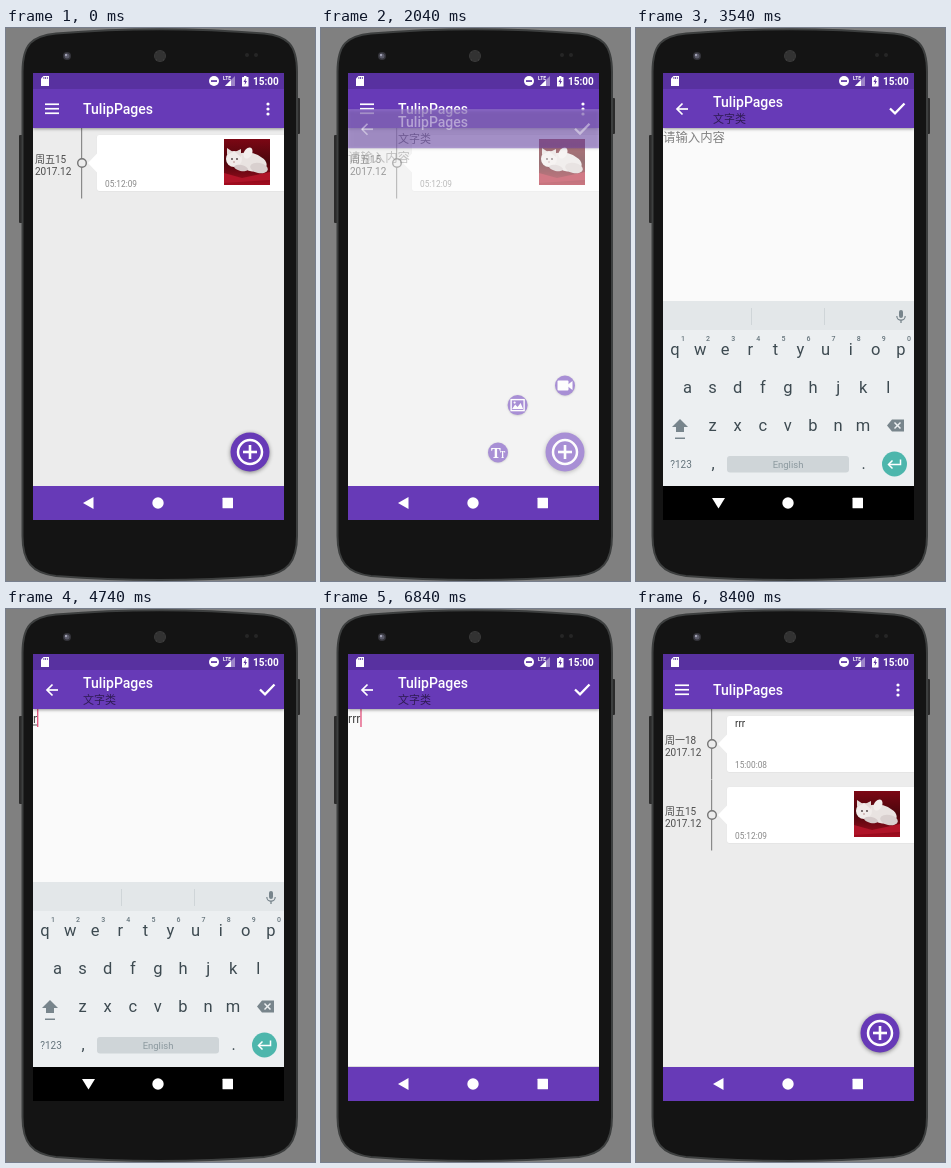
Animation, 309 px wide and 553 px high, one loop 9.24 s. Source, as an HTML page with a canvas:

```html
<!DOCTYPE html>
<html lang="zh-CN">
<head>
<meta charset="utf-8">
<style>
html, body { margin: 0; width: 100%; height: 100%; overflow: hidden; background: #808080; }
canvas { display: block; width: 309px; height: 553px; }
</style>
</head>
<body>
<canvas id="stage"></canvas>
<script>
const W = 309, H = 553, LOOP = 9240, TICK = 60;
const PURPLE = '#673ab7', GREY = '#78858c';
const TITLE = 'TulipPages';
const FONT = 'Roboto, "Noto Sans CJK SC", "Noto Sans CJK", sans-serif';
const canvas = document.getElementById('stage');
const c = canvas.getContext('2d');
const ratio = window.devicePixelRatio || 1;
canvas.width = W * ratio;
canvas.height = H * ratio;
c.scale(ratio, ratio);

const clamp = x => Math.max(0, Math.min(1, x));
const easeOut = x => 1 - (1 - x) ** 2;
const backOut = x => 1 + 2.2 * (x - 1) ** 3 + 1.2 * (x - 1) ** 2;

function rect(x, y, w, h, fill, r = 0) {
  c.fillStyle = fill;
  c.beginPath();
  c.roundRect(x, y, w, h, r);
  c.fill();
}
function disc(x, y, r, fill) {
  c.fillStyle = fill;
  c.beginPath();
  c.arc(x, y, r, 0, 7);
  c.fill();
}
function ring(x, y, r, color, width) {
  c.strokeStyle = color;
  c.lineWidth = width;
  c.beginPath();
  c.arc(x, y, r, 0, 7);
  c.stroke();
}
function oval(x, y, rx, ry, turn, fill) {
  c.fillStyle = fill;
  c.beginPath();
  c.ellipse(x, y, rx, ry, turn, 0, 7);
  c.fill();
}
function trace(points) {
  c.beginPath();
  for (let i = 0; i < points.length; i += 2) c.lineTo(points[i], points[i + 1]);
}
function poly(fill, ...points) {
  trace(points);
  c.fillStyle = fill;
  c.fill();
}
function line(color, width, ...points) {
  trace(points);
  c.strokeStyle = color;
  c.lineWidth = width;
  c.stroke();
}
function text(s, x, y, size, color, weight = 400, align = 'left', family = FONT) {
  c.font = `${weight} ${size}px ${family}`;
  c.textAlign = align;
  c.fillStyle = color;
  c.fillText(s, x, y);
}
function layer(draw, { alpha = 1, dy = 0, clip } = {}) {
  c.save();
  if (clip) {
    c.beginPath();
    c.rect(...clip);
    c.clip();
  }
  c.globalAlpha = alpha;
  c.translate(0, dy);
  draw();
  c.restore();
}
function withShadow(blur, dy, alpha, draw) {
  c.save();
  c.shadowColor = `rgba(0,0,0,${alpha})`;
  c.shadowBlur = blur * ratio;
  c.shadowOffsetY = dy * ratio;
  draw();
  c.restore();
}

function phone() {
  rect(0, 0, W, H, '#808080');
  rect(13, 107, 5, 88, '#2b2b2b', 1);
  rect(290, 70, 4, 36, '#2b2b2b', 1);
  c.beginPath();
  c.moveTo(16.5, 44);
  c.bezierCurveTo(16.5, 16, 26, 8, 50, 5.5);
  c.quadraticCurveTo(153, -3, 258, 5.5);
  c.bezierCurveTo(281, 8, 291, 16, 291, 44);
  c.lineTo(291, 508);
  c.bezierCurveTo(291, 534, 281, 545, 258, 548);
  c.quadraticCurveTo(153, 556, 50, 548);
  c.bezierCurveTo(26, 545, 16.5, 534, 16.5, 508);
  c.closePath();
  c.fillStyle = '#141414';
  c.fill();
  c.strokeStyle = '#3d3f3f';
  c.lineWidth = 2;
  c.stroke();
  disc(61, 28, 4, '#34343a');
  disc(61, 28, 2.5, '#5a5a68');
  disc(60, 27, 1.2, '#a0a0b4');
  disc(154, 28, 6, '#3c3c3c');
  for (let y = -4; y <= 4; y += 2)
    for (let x = -4; x <= 4; x += 2)
      if (x * x + y * y < 26) rect(153.5 + x, 27.5 + y, 1, 1, '#161616');
  disc(241, 27, 2, '#262626');
  disc(250, 27, 2, '#262626');
}

function statusBar() {
  rect(27, 45, 251, 16, '#5831a0');
  poly('#fff', 37.5, 48, 43, 48, 43, 58, 35, 58, 35, 50.5);
  for (let i = 0; i < 3; i++) rect(37.5 + i * 1.7, 49, 0.8, 2, '#5831a0');
  disc(208, 53, 5, '#fff');
  rect(205, 52.2, 6, 1.7, '#5831a0');
  poly('#9d85c8', 219, 58, 229, 58, 229, 48);
  poly('#fff', 219, 58, 225, 58, 225, 52);
  text('LTE', 217, 52, 5, '#fff', 700);
  rect(236, 49, 6.5, 9.5, '#fff', 0.6);
  rect(238, 48, 2.5, 2, '#fff');
  poly('#5831a0', 239.8, 50, 237.5, 54, 239, 54, 238.7, 57, 241, 53, 239.6, 53);
  text('15:00', 247, 57, 10, '#fff', 700);
}

function navBar(dark, down) {
  rect(27, 458, 251, 34, dark ? '#000' : PURPLE);
  if (down) poly('#fff', 76, 470, 89, 470, 82.5, 480.5);
  else poly('#fff', 77, 475, 87.5, 469, 87.5, 481);
  disc(152, 475, 5.7, '#fff');
  rect(216.5, 469.8, 10.5, 10.5, '#fff', 0.5);
}

function toolbar() {
  withShadow(3, 1, 0.4, () => rect(27, 61, 251, 39, PURPLE));
}

function photo(x, y) {
  layer(() => {
    c.translate(x, y);
    const red = c.createLinearGradient(0, 0, 0, 46);
    red.addColorStop(0, '#7c0714');
    red.addColorStop(0.5, '#4a060c');
    red.addColorStop(1, '#a40c1f');
    rect(0, 0, 46, 46, red);
    poly('#b01428', 0, 34, 18, 39, 46, 33, 46, 41, 0, 44);
    oval(27, 23, 16, 9, 0.25, '#e9e3e1');
    oval(35, 29, 9, 5, 0.2, '#d9d0cf');
    oval(10, 20, 8, 8, 0, '#f1ecea');
    poly('#e6dcda', 3, 16, 3, 9, 9, 13);
    poly('#e6dcda', 11, 13, 17, 10, 17, 18);
    oval(24, 14, 4, 6, 0.5, '#f3efed');
    oval(17, 29, 7, 3, 0.2, '#d5caca');
    disc(8, 20, 0.9, '#493c3e');
    disc(13, 20, 0.9, '#493c3e');
    disc(10, 23, 0.8, '#b58787');
  });
}

function note(y, day, time, body) {
  rect(75, y, 1.2, 70.5, '#8a8a8a');
  disc(76, y + 35, 4.5, '#ececec');
  ring(76, y + 35, 4.3, '#737373', 1.4);
  withShadow(1, 0.3, 0.1, () => rect(91, y + 7, 189, 56, '#fff', 2));
  poly('#fff', 91.5, y + 25, 82, y + 35, 91.5, y + 45);
  text(day, 29, y + 35, 10, '#4c4c4c');
  text('2017.12', 29, y + 47, 10, '#4c4c4c');
  text(time, 99, y + 58.5, 8.3, '#888');
  if (body) text(body, 99, y + 18, 10, '#333');
  else photo(218, y + 11);
}

function textIcon() {
  const serif = '"Noto Serif", serif';
  text('T', -2, 5.5, 15, '#fff', 700, 'center', serif);
  text('T', 4.5, 5.5, 8, '#fff', 700, 'center', serif);
}
function imageIcon() {
  c.strokeStyle = '#fff';
  c.lineWidth = 1.4;
  c.strokeRect(-6.5, -5.5, 13, 11);
  poly('#fff', -5.5, 4, -2.5, -0.5, 0, 2, 3, -2, 5.5, 4);
  disc(-3, -2.5, 1.1, '#fff');
}
function videoIcon() {
  rect(-7.5, -5, 11, 10, '#fff', 1);
  poly('#fff', 3, -1, 7.5, -4.5, 7.5, 4.5, 3, 1);
}

function actionMenu(t) {
  if (t >= 840 && t < 8280) {
    const reach = 67 * backOut(clamp((t - 840 + TICK) / 540));
    [videoIcon, imageIcon, textIcon].forEach((icon, i) => layer(() => {
      const angle = -Math.PI / 2 - i * Math.PI / 4;
      c.translate(244 + reach * Math.cos(angle), 424.5 + reach * Math.sin(angle));
      withShadow(2, 0.5, 0.35, () => disc(0, 0, 10, PURPLE));
      icon();
    }));
  }
  withShadow(4, 1, 0.45, () => disc(244, 424, 19.5, PURPLE));
  ring(244, 424, 12, '#fff', 2.5);
  line('#fff', 2.6, 237, 424, 251, 424);
  line('#fff', 2.6, 244, 417, 244, 431);
}

function listPage(t) {
  rect(27, 61, 251, 397, '#ececec');
  const saved = t >= 8280;
  layer(() => {
    if (saved) note(100, '周一18', '15:00:08', 'rrr');
    note(saved ? 171 : 100, '周五15', '05:12:09');
  }, { clip: [27, 100, 251, 358] });
  toolbar();
  for (const y of [76.2, 80.7, 85.2]) rect(39, y - 0.8, 14, 1.7, '#fff');
  for (const y of [76, 81, 86]) disc(262, y, 1.6, '#fff');
  text(TITLE, 77, 86, 14, '#fff', 500);
  actionMenu(t);
}

const caretSpans = [[2160, 2520], [2940, 3420], [3960, 4380], [4680, 5580], [5880, 6360], [6840, 7320]];

// Presses and letters alternate, one tick each.
const typingTick = t => Math.floor((t - 4680) / TICK);

function ripple(t) {
  if (t < 7740 || t >= 8100) return;
  const p = clamp((t - 7740 + TICK) / 180);
  disc(261, 81, 6 + 8 * p, `rgba(255,255,255,${0.1 + 0.1 * p})`);
}

function editorPage(t) {
  rect(27, 61, 251, 397, '#fafafa');
  const typed = 'r'.repeat(Math.max(0, Math.min(3, (typingTick(t) + 1) >> 1)));
  if (typed) text(typed, 27, 114, 12.2, '#444');
  else text('请输入内容', 27, 114, 12.4, '#828282');
  const width = typed ? c.measureText(typed).width : 0;
  if (typed && t < 5820) rect(27, 115.5, width, 1, '#555');
  if (caretSpans.some(([from, to]) => t >= from && t < to)) rect(27 + width, 100, 1.2, 18, '#e0406f');
  toolbar();
  ripple(t);
  line('#fff', 1.7, 52, 81, 41, 81);
  line('#fff', 1.7, 46.5, 75.5, 41, 81, 46.5, 86.5);
  text(TITLE, 77, 79, 14, '#fff', 500);
  text('文字类', 77, 95, 11, '#301c56');
  line('#fff', 2.3, 254, 80.5, 259, 85.3, 268.5, 75.5);
  rect(27, 457, 251, 1, '#dcdcdc');
}

function keyboard(t) {
  const k = typingTick(t), ink = '#3d4a51', pitch = 25.1;
  rect(27, 273, 251, 185, '#eceff1');
  rect(27, 273, 251, 29, '#e3e7e9');
  for (const x of [115, 188]) rect(x, 280, 1, 17, '#cfd5d8');
  if (k >= 6) ['err', 'red', 'ref'].forEach((s, i) => text(s, 83.5 + 68.5 * i, 293, 12.5, '#66757d', 400, 'center'));
  if (k >= 7) for (const x of [148.5, 152, 155.5]) disc(x, 300, 1.3, '#4b575d');

  rect(263, 282, 4, 8, GREY, 2);
  c.strokeStyle = GREY;
  c.lineWidth = 1.2;
  c.beginPath();
  c.arc(265, 288, 4.2, 0, Math.PI);
  c.stroke();
  line(GREY, 1.3, 265, 292, 265, 295);

  const pressed = k >= 0 && k < 6 && k % 2 === 0;
  if (pressed) rect(102, 303, 25, 36, '#d9dfe2', 2);
  [['qwertyuiop', 39, 327], ['asdfghjkl', 51.5, 365], ['zxcvbnm', 76.5, 403]].forEach(([keys, x, y]) =>
    [...keys].forEach((s, i) => text(s, x + pitch * i, y, 16.5, ink, 400, 'center')));
  [...'1234567890'].forEach((s, i) => text(s, 47 + pitch * i, 313, 7, '#65747c', 500, 'center'));

  poly(GREY, 44, 391, 52, 399, 48, 399, 48, 404, 40, 404, 40, 399, 36, 399);
  rect(39, 409.5, 10, 1.5, GREY);
  poly(GREY, 251, 397.5, 256, 391.5, 268, 391.5, 268, 403.5, 256, 403.5);
  line('#eceff1', 1.5, 258.5, 394.5, 264.5, 400.5);
  line('#eceff1', 1.5, 264.5, 394.5, 258.5, 400.5);

  text('?123', 45, 440, 10, '#65747c', 400, 'center');
  text(',', 77, 441, 16, ink, 400, 'center');
  rect(91, 428, 122, 16.5, '#cfd5d8', 3);
  text('English', 152, 439.5, 9.5, '#8c999f', 400, 'center');
  text('.', 227.5, 441, 16, ink, 400, 'center');
  disc(258.5, 436, 12.5, '#4db6ac');
  line('#fff', 1.5, 264.5, 431.5, 264.5, 436.5, 253, 436.5);
  line('#fff', 1.5, 256.5, 432.5, 252.5, 436.5, 256.5, 440.5);

  if (pressed) {
    withShadow(3, 1, 0.3, () => rect(98, 258, 33, 43, '#f5f7f8', 3));
    text('r', 114.5, 287, 21, ink, 400, 'center');
  }
}

function keyboardShown(t) {
  if (t < 3420 || t >= 6180) return 0;
  return t < 5820 ? easeOut(clamp((t - 3360) / 180)) : 1 - clamp((t - 5760) / 420) ** 2;
}

function editorShown(t) {
  if (t < 2040 || t >= 8400) return 0;
  return t < 8280 ? easeOut(clamp((t - 1980) / 240)) : 1 - clamp((t - 8220) / 180);
}

function draw(t) {
  phone();
  statusBar();
  const page = editorShown(t), keys = keyboardShown(t);
  const clip = [27, 61, 251, 397];
  if (page < 1) layer(() => listPage(t), { clip });
  if (page > 0) layer(() => editorPage(t), { clip, alpha: page, dy: 36 * (1 - page) });
  if (keys > 0) layer(() => keyboard(t), { clip, alpha: keys, dy: 30 * (1 - keys) });
  navBar(keys > 0, t >= 3180 && t < 5820);
}

const start = performance.now();
function loop() {
  const t = (performance.now() - start) % LOOP;
  draw(Math.floor(t / TICK) * TICK);
  requestAnimationFrame(loop);
}
loop();
</script>
</body>
</html>
```
